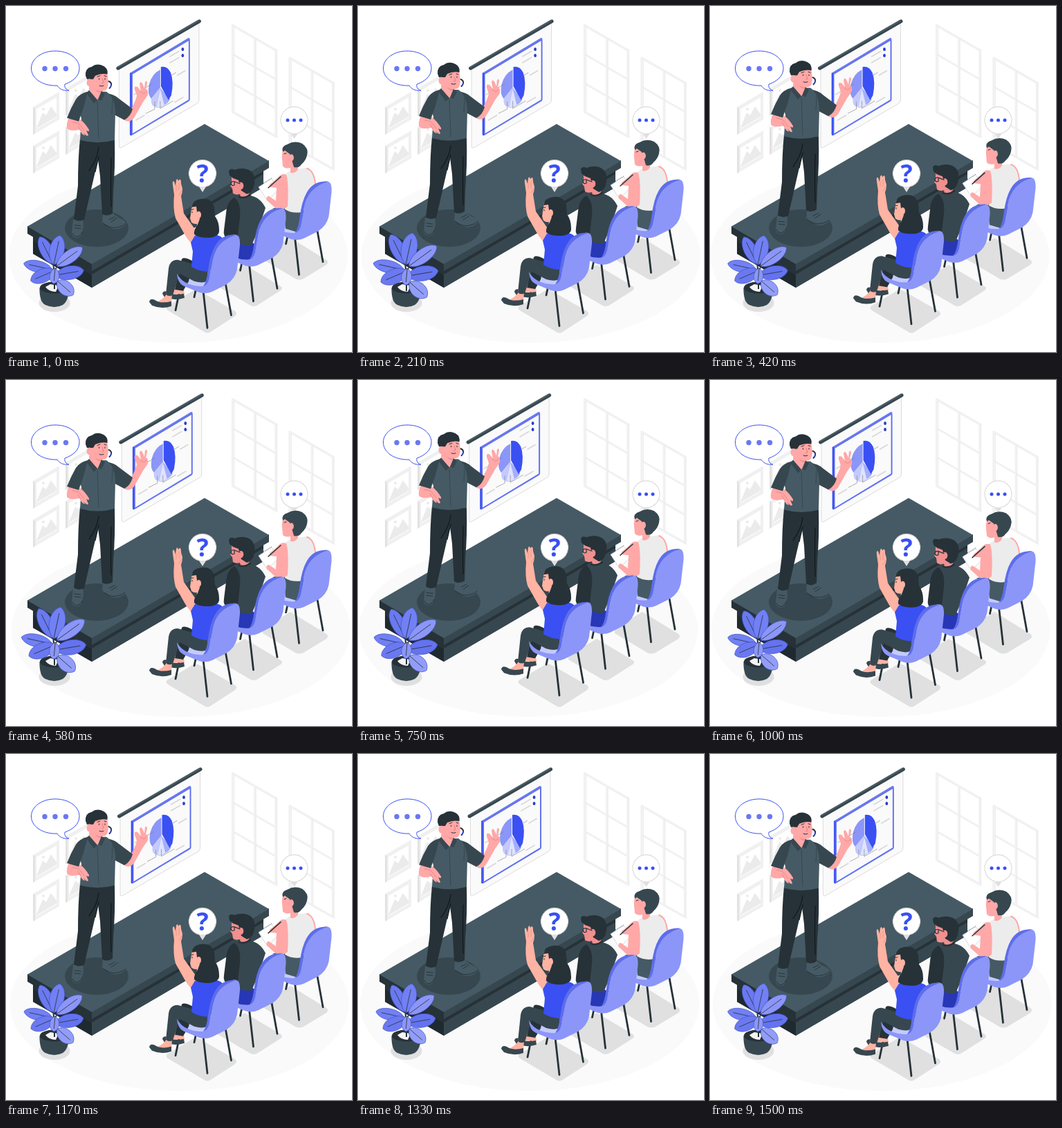
These frames come from a looping animation (500x500 px, 1540 ms). An HTML page:

```html
<!DOCTYPE html>
<html lang="en">
<head>
<meta charset="utf-8">
<title>Presentation</title>
<style>
html, body { margin: 0; width: 100%; height: 100%; overflow: hidden; background: #fff; }
svg { display: block; width: 100vw; height: 100vh; }
.d { fill: #263238; } .g { fill: #37474f; } .m { fill: #455a64; }
.skin { fill: #ffa8a7; } .tan { fill: #ffb3a3; } .rose { fill: #f28f8f; }
.blue { fill: #3a50f2; } .soft { fill: #8b96f8; } .pale { fill: #c4cafc; }
.shade { fill: #e0e0e0; }
.line { fill: none; stroke-linecap: round; stroke-linejoin: round; }
</style>
</head>
<body>
<svg viewBox="0 0 500 500">
<defs>
  <g id="window" class="line" stroke="#f1f1f1">
    <path stroke-width="3.4" d="M327.500 28 390 64V188.500L327.500 153Z"/>
    <path stroke-width="2.800" d="M359.500 47V171M328 70 390 106M328 112 390 148"/>
    <path stroke="#e6e6e6" stroke-width=".7" d="M330 31V151M361.300 48V170M391.500 63V191"/>
  </g>
  <g id="picture">
    <path fill="#f0f0f0" d="M39 146 77 124V164L39 186Z"/>
    <path fill="#e2e2e2" d="M39 146 42 147.500V184L39 186Z"/>
    <path fill="#fff" d="M44 149 73 132V161L44 178Z"/>
    <path fill="#ebebeb" d="M44 176 53 154 58 158 65 145 73 156V160L44 177Z"/>
    <circle cx="54" cy="149" r="2" fill="#ebebeb"/>
  </g>
  <g id="seat">
    <path class="line" stroke="#263238" stroke-width="2.800" d="M254 396 245 440M276 402 272 421M285 412 291 465.500M317 400 325.500 447"/>
    <path class="pale" d="M247 387Q247 381 256 383L291 396 296 404 286 410Q256 406 247 387Z"/>
  </g>
  <g id="back">
    <path class="soft" d="M335 332Q338.500 335 338 346L334 381Q331 395 318 403L298 413Q289 417 279 414L257 405Q248 401 247 387 252 397 264 402 274 406 285 405 292 403 294 391L299 365Q305 340 324 332 331 329 335 332Z"/>
    <path fill="#5e6dea" d="M333 331Q312 329 302 347 295 359 292 382 290 399 285 405 291 404 293.500 395L298 370Q303 339 333 331Z"/>
  </g>
</defs>

<ellipse class="shake" cx="249" cy="361" rx="245" ry="126" fill="#fafafa"/>

<use href="#window"/>
<use href="#window" x="82.500" y="47"/>
<use href="#picture"/>
<use href="#picture" y="56"/>
<use href="#picture" x="47" y="-27"/>
<use href="#picture" x="47" y="29"/>

<g class="shake">
  <path fill="#fafafa" stroke="#dcdcdc" stroke-width="1" d="M163.500 91 279 25V136Q279 139 276 141L168 204Q163.500 207 163.500 202Z"/>
  <path class="line" stroke="#37474f" stroke-width="5" d="M162 90 279.500 22"/>
  <path class="line" stroke="#546670" stroke-width="1.400" d="M162 88.500 279 21"/>
  <path fill="#6a78ee" d="M179 97 263 46.500Q266 45 266 49V135Q266 137 264 138L182 187Q179 188 179 185Z"/>
  <path fill="#fafafa" stroke="#3a50f2" stroke-width=".7" d="M182.500 98.500 264.500 49.500V135.500L182.500 185Z"/>
  <path class="line" stroke="#3a50f2" stroke-width="2" d="M180.500 97.500V186"/>
  <path class="soft" d="M223 118V92Q211 98 207 113 204 128 210 134Z"/>
  <path class="pale" d="M223 118 210 134Q209 145 217 146L222 145Z"/>
  <path fill="#dfe3fe" stroke="#aab3fa" stroke-width=".6" d="M223 118 217 146Q223 148 229 143Z"/>
  <path fill="#a4aefa" d="M223 118 229 143Q234 141 237 135Z"/>
  <path class="blue" d="M224 116V88Q233 86 238 96 243 109 239 129L235 136Z"/>
  <g class="line" stroke="#777" stroke-width=".8" stroke-dasharray="1 1.500">
    <path d="M238 101 246 96M191 124 211 113M203 155 215 149V138M223 138V148L242 137"/>
  </g>
  <path class="line" stroke="#d8d8d8" stroke-width="1.600" d="M237 73 250 65.500M237 82 250 74.500M248 100 259 93.500M185 128 194 123M188 165 200 158M244 139 256 132"/>
  <ellipse cx="255.500" cy="62.500" rx="1.900" ry="2.500" fill="#2a3cc8"/>
  <ellipse cx="255.500" cy="71.500" rx="1.900" ry="2.500" fill="#2a3cc8"/>
</g>

<!-- stage -->
<path class="d" d="M39 331 124 380 372 235V262L124 407 39 358Z"/>
<path class="g" d="M124 388 372 243V262L124 407Z"/>
<path fill="#1f2a30" d="M39 340 124 389V407L39 358Z"/>
<path class="d" d="M31 318 124 372V383L31 329Z"/>
<path class="g" d="M124 372 380 223V234L124 383Z"/>
<path class="m" d="M31 318.500 287 170.500 380 224 124 373Z"/>
<ellipse class="g" cx="131" cy="321" rx="46" ry="27"/>

<!-- speech bubble -->
<path fill="#fff" stroke="#3a50f2" d="M71 65C91 65 106 76 106 90 106 101 97 109 85 113 84 118 87 121 91 122 83 123 77 120 74 115 52 116 36.500 104 36.500 90 36.500 76 52 65 71 65Z"/>
<g fill="#6a78f2"><circle cx="56" cy="90.500" r="3.700"/><circle cx="71" cy="90.500" r="3.700"/><circle cx="86.500" cy="90.500" r="3.700"/></g>

<!-- speaker -->
<g class="float">
  <path class="m" d="M97 309 111 308Q113 318 110 327 109 335 102 335.500 95 335 95 328Z"/>
  <path class="m" d="M140 300 154 299Q160 306 169 309 175 313 172 317 161 326 151 321 146 316 139 314Z"/>
  <path class="line" stroke="#263238" stroke-width=".9" d="M96 329Q98 334 102 334 108 333 110 327M99 317 108 318M99 321 108 322M140 314Q150 323 162 320 170 318 172 315M149 309 157 305M152 312 160 307"/>
  <path class="d" d="M107 192 157 194Q158 234 155 268L154 300Q146 305 139 301L136 246 133 222 127 248 113 309Q104 313 98 308L104 260Q104 220 107 192Z"/>
  <path class="line" stroke="#11191d" stroke-width="1.200" d="M134 205Q132 222 120 238M134 218 129 240M152 220Q151 260 152 290"/>
  <path class="skin" d="M171 160 181 149Q187 138 189 130L186 121Q185 115 190 117L195 123 193 113Q194 108 197 112L200 119 201 110Q204 107 204 112L202 120Q206 121 205 129L198 139 185 162Q178 170 171 165Z"/>
  <path class="g" d="M144 126Q157 128 163 134L183 149Q180 160 171 165L152 155Z"/>
  <path class="m" d="M118 124 145 124Q157 132 158 153L157 194Q132 201 107 194L109 163 102 140Z"/>
  <path class="skin" d="M94 160 107 164Q114 169 120 179 121 183 116 180L119 187Q117 190 112 183L114 187Q111 188 106 179 92 182 88 177 87 169 91 162Z"/>
  <path class="line" stroke="#e58083" stroke-width=".8" d="M96 168 105 170 113 180M104 174 108 180M194 124 199 127 203 124"/>
  <path class="g" d="M118 124Q106 127 101 135 94 147 88 162L105 167 112 147Z"/>
  <path class="line" stroke="#37474f" stroke-width="1" d="M132 139 134 192M154 136 153 156"/>
  <path class="skin" d="M121 97H146Q149 111 147 117 146 123 139 123L138 130 132 136 120 123Z"/>
  <path class="rose" d="M129 120Q133 124 139 123V125.500Q131 126 129 120Z"/>
  <path class="d" d="M115 101Q114 90 124 88 131 82 141 87 148 91 146.500 99 138 97 129 101L126 106H117Z"/>
  <ellipse class="skin" cx="120.500" cy="111" rx="4" ry="5.500"/>
  <path class="g" d="M120 122 132 136 127 141 116 126ZM138 123 143 127 138 137 133 135Z"/>
  <path class="line" stroke="#263238" stroke-width="1" d="M132 102.500 136 101M142 101 145 102M134.500 105V106.500M143 105V106.500M135 115.500Q138 117 141 115.500"/>
  <path class="line" stroke="#e57878" stroke-width=".9" d="M139 105 141 111 138.500 112"/>
  <path class="line" stroke="#263238" stroke-width="2" d="M148.500 109Q153 111 152 115 151 118 149.500 119"/>
  <path class="line" stroke="#3a50f2" stroke-width="1.200" d="M152 114 150.500 118"/>
</g>

<!-- plant -->
<ellipse class="shade" cx="70" cy="429" rx="22.500" ry="13"/>
<path class="g" d="M48.500 407Q48 428 57 432 70 438 82 432 91 426 91 406Z"/>
<ellipse class="d" cx="70" cy="407" rx="21" ry="8.500"/>
<path fill="#f5f5f5" d="M57 406 64 402 76 404 72 413Q62 413 57 406Z"/>
<g id="plant"></g>

<!-- shadows on the floor -->
<path class="shade" d="M234 433 271 411Q275 409 280 412L331 441Q335 444 331 448L297 470Q291 475 285 470L234 440Q229 436 234 433Z"/>
<path class="shade" d="M304 398 345 374 397 405Q401 408 397 411L364 432Q358 436 352 432L304 404Z"/>
<path class="shade" d="M371 359 411 335 463 367Q467 370 463 374L430 394Q424 397 418 394L371 366Z"/>

<!-- thought bubbles -->
<g fill="#fff" stroke="#dcdcdc" stroke-width="1.200">
  <path id="balloon" d="M279.500 261A19.500 19.500 0 1 1 288.500 261L284 268Z"/>
  <use href="#balloon" x="132.500" y="-77"/>
</g>
<path class="shade" d="M279.500 261H288.500L284 268ZM412 184H421L416.500 191Z"/>
<text class="blue" x="284" y="254.500" text-anchor="middle" font-family="'Open Sans', sans-serif" font-weight="700" font-size="36">?</text>
<g class="blue"><circle cx="407" cy="165" r="2.500"/><circle cx="416.500" cy="165" r="2.500"/><circle cx="426" cy="165" r="2.500"/></g>

<g class="float">
  <!-- note taker -->
  <use href="#seat" x="132.500" y="-77"/>
  <path class="m" d="M385 293 405 288 431 296 424 328 404 322 402 305Z"/>
  <path fill="#ececec" d="M403 244Q411 236 419 236L437 234Q446 241 448 258L441 275 428 298Q414 301 403 294L404 270Z"/>
  <path class="line" stroke="#ffa8a7" stroke-width="2" d="M435 235Q445 238 447 257"/>
  <path fill="#fff" stroke="#cfd3dc" stroke-width=".8" d="M365 262 384 250 394 265 378 282Z"/>
  <path class="line" stroke="#455a64" stroke-width=".9" stroke-dasharray=".5 2" d="M366 260 384 249"/>
  <path class="skin" d="M392 249Q398 241 405 244 409 256 407 290 397 298 389 292L377 281Q375 275 380 275L390 282 391 263 382 262Q378 259 385 255Z"/>
  <path class="line" stroke="#263238" stroke-width="1.500" d="M379 263 397 247"/>
  <path class="skin" d="M401 207Q398 215 399 221L400 232Q404 236 411 234V241Q418 243 422 236L423 215Z"/>
  <path class="g" d="M400 211Q397 203 407 200 417 194 428 199 438 206 435 216 433 224 427 229 423 235 416 233L414 226 410 214 403 209Z"/>
  <ellipse class="skin" cx="412.500" cy="219.500" rx="3.400" ry="5"/>
  <path class="line" stroke="#263238" stroke-width="1" d="M402 214 405 213"/>
  <use href="#back" x="132.500" y="-77"/>

  <!-- man with glasses -->
  <use href="#seat" x="66.500" y="-38.500"/>
  <path fill="#2737b5" d="M315 342 340 333 361 345 356 366Q346 371 335 365Z"/>
  <path class="g" d="M330 277Q337 271 352 274 367 276 375 292L364 325 355 346Q340 348 334 340L329 305Z"/>
  <path class="d" d="M330 277Q319 283 318 300L315 324Q313 334 322 337L335 332 338 306Q340 285 330 277Z"/>
  <path class="rose" d="M326 247 326 258 324 260 327 264 328 271Q332 274 338 272L339 276Q348 278 352 270V247Z"/>
  <path class="d" d="M322 239Q324 234 330 237 344 232 354 239 361 245 359 257 357 270 348 272L340 267 336 252 328 249 323 245Z"/>
  <ellipse class="rose" cx="339.500" cy="260" rx="3.800" ry="5.200"/>
  <path class="line" stroke="#263238" stroke-width="1.200" d="M338 257 330 254Q325 253 325 257 326 261 330 259V254"/>
  <path class="line" stroke="#263238" stroke-width="2.500" d="M337 276Q345 279 353 273"/>
  <use href="#back" x="66.500" y="-38.500"/>

  <!-- woman with raised hand -->
  <use href="#seat"/>
  <path class="tan" d="M246 402 256 404 258 417 238 416Z"/>
  <path class="g" d="M226 416Q227 411 233 413 240 419 257 416L258 422Q243 427 229 421Z"/>
  <path class="d" d="M254 366Q257 362 270 369L264 398 256 412 244 410Z"/>
  <path class="tan" d="M231 414 240 416 239 430 216 429Q227 424 231 418Z"/>
  <path class="g" d="M207 428Q208 422 215 425 223 431 239 427L239 434Q225 439 211 433Z"/>
  <path class="g" d="M270 373 292 381 291 397Q286 402 272 398L251 387 241 418Q235 421 231 417L235 379Q237 367 248 367Z"/>
  <path class="tan" d="M241 259Q240 252 243 254L245 260 246 252Q248 248 249 253L251 251Q253 250 253 257L255 264Q255 270 253 275L257 300 276 327 272 346Q264 341 258 330L245 307Q241 293 243 273Z"/>
  <path class="line" stroke="#ec8d85" stroke-width=".8" d="M246 259V267M250 256V266M254 267 250 273"/>
  <path class="blue" d="M273 332Q285 327 304 331 317 334 315 345L307 373 292 384Q279 384 268 377L270 355 267 342Z"/>
  <path class="tan" d="M269 287 267 300 266 307 268 313Q272 316 276 315L274 332 288 333V287Z"/>
  <path class="d" d="M268 291Q270 280 282 279 297 277 301 291L302 304Q308 312 308 324 309 333 295 335 278 336 272 330 271 324 277 316L280 308 276 298 275 290Z"/>
  <ellipse class="tan" cx="278.500" cy="302" rx="3.500" ry="5.200"/>
  <path class="line" stroke="#263238" stroke-width="1" d="M268 294.500 271 294M269 297.500V299"/>
  <use href="#back"/>
</g>
</svg>

<script>
const PERIOD = 1500, LOOP = 1540, STEP = 1000 / 24;
const floatY = [[0, 0], [.5, -10], [1, 0]];
const shakeX = [[0, 0], [.1, -1], [.2, 2], [.3, -4], [.4, 4], [.5, -4], [.6, 4], [.7, -4], [.8, 2], [.9, -1], [1, 0]];
const beat = [[0, 1], [.14, 1.1], [.28, 1], [.42, 1.1], [.7, 1], [1, 1]];

const plant = document.getElementById('plant');
const floaters = document.querySelectorAll('.float');
const shakers = document.querySelectorAll('.shake');

// A leaf from its base to its tip, with a stem and a vein
function leaf(x, y, tipX, tipY, width, fill) {
  const dx = tipX - x, dy = tipY - y, len = Math.hypot(dx, dy);
  const nx = -dy / len * width, ny = dx / len * width;
  const point = (f, s) => `${x + dx * f + nx * s} ${y + dy * f + ny * s}`;
  return `<path class="line" stroke="#263238" stroke-width="1.2" d="M70 408Q70 395 ${x} ${y}"/>
    <path fill="${fill}" stroke="#4453c4" stroke-width=".7"
      d="M${x} ${y}C${point(.2, 1)} ${point(.85, 1)} ${tipX} ${tipY}C${point(.85, -1)} ${point(.2, -1)} ${x} ${y}Z"/>
    <path class="line" stroke="#263238" stroke-width=".8" d="M${x} ${y}L${point(.8, 0)}"/>`;
}

plant.innerHTML = [
  [68, 373, 49, 334, 12, '#6b79f1'],
  [69, 374, 78, 332, 14, '#7180f4'],
  [73, 376, 110, 349, 12, '#8b96f8'],
  [67, 381, 26, 372, 11, '#7180f4'],
  [71, 382, 36, 397, 13, '#6b79f1'],
  [71, 389, 112, 382, 13, '#6473ee'],
  [74, 397, 97, 417, 13, '#929df9'],
  [71, 379, 69, 401, 9, '#8b96f8']
].map(args => leaf(...args)).join('');

function at(track, p) {
  const i = track.findIndex(([pos]) => pos >= p);
  if (i <= 0) return track[0][1];
  const [p0, v0] = track[i - 1], [p1, v1] = track[i];
  return v0 + (v1 - v0) * (p - p0) / (p1 - p0);
}

function draw() {
  const step = Math.floor((performance.now() % LOOP + 4) / STEP);
  const p = (step + .5) * STEP / PERIOD % 1;
  const y = at(floatY, p), x = at(shakeX, p), s = at(beat, p);
  floaters.forEach(el => el.setAttribute('transform', `translate(0 ${y})`));
  shakers.forEach(el => el.setAttribute('transform', `translate(${x} 0)`));
  plant.setAttribute('transform', `translate(69 375) scale(${s}) translate(-69 -375)`);
  requestAnimationFrame(draw);
}
draw();
</script>
</body>
</html>
```
